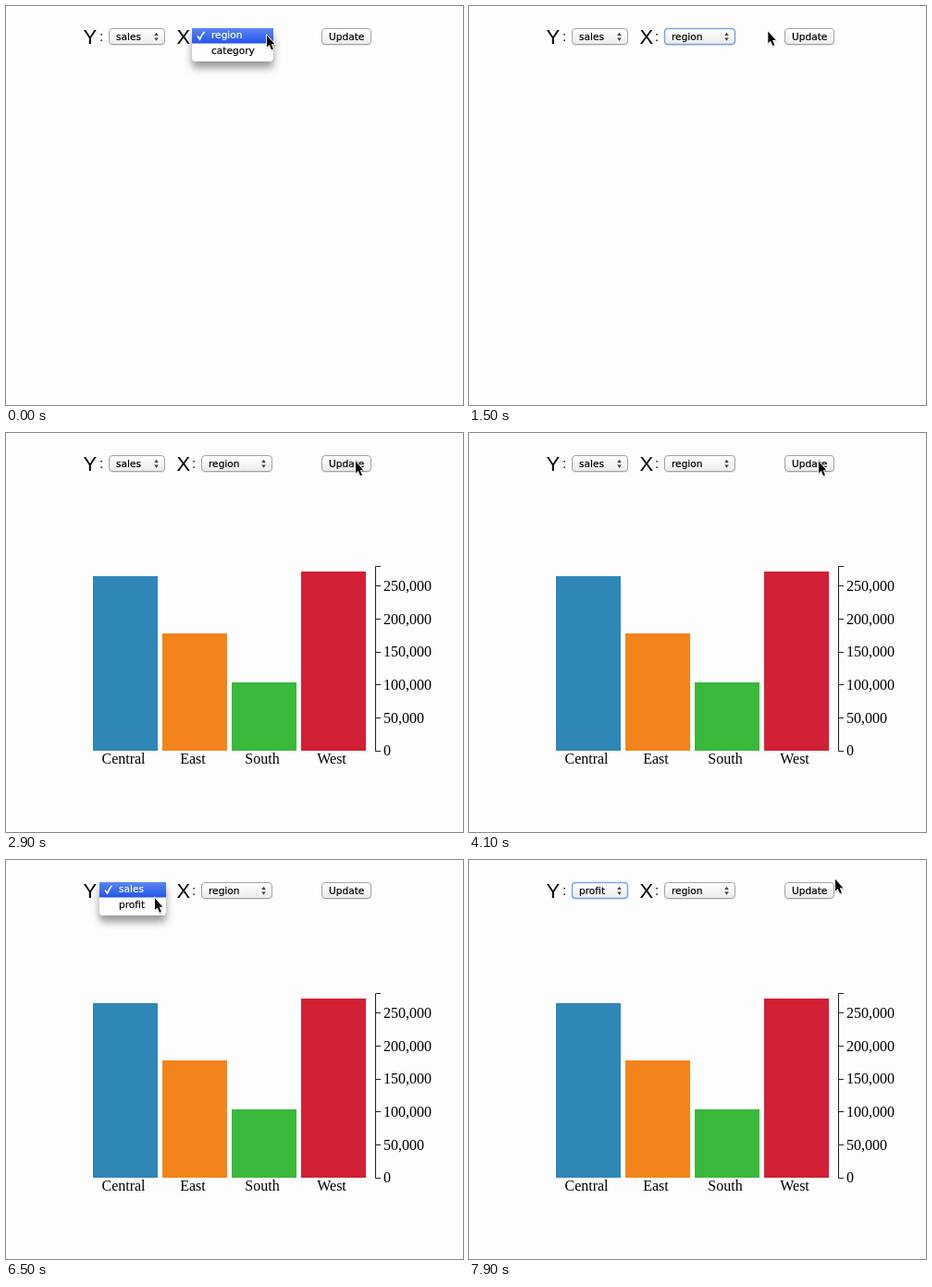
Animation, 494 px wide and 432 px high, one loop 8 s. Source, as an HTML page:

```html
<!DOCTYPE html>
<html lang="en">
<head>
<meta charset="utf-8">
<title>Bar chart form</title>
<style>
  html, body { margin: 0; width: 100%; height: 100%; overflow: hidden; background: #fdfdfd; }
  svg { display: block; }
  .ui { font: 10.6px "DejaVu Sans", sans-serif; }
  .ui text { stroke: currentColor; fill: currentColor; stroke-width: .2; }
  .big { font: 22px "Liberation Sans", sans-serif; }
  .colon { font: 15px "Liberation Sans", sans-serif; }
  #chart { font: 16px "Liberation Serif", serif; }
</style>
</head>
<body>
<svg width="494" height="432" viewBox="0 0 494 432">
  <defs>
    <linearGradient id="grey" x2="0" y2="1">
      <stop stop-color="#fff"/><stop offset=".5" stop-color="#f6f6f6"/><stop offset="1" stop-color="#ebebeb"/>
    </linearGradient>
    <linearGradient id="pressed" x2="0" y2="1">
      <stop stop-color="#a9c8f3"/><stop offset=".5" stop-color="#6a9fe8"/><stop offset="1" stop-color="#9ccaf8"/>
    </linearGradient>
    <linearGradient id="chosen" x2="0" y2="1">
      <stop stop-color="#5c87f4"/><stop offset="1" stop-color="#2453ea"/>
    </linearGradient>
    <filter id="shade" x="-30%" y="-30%" width="160%" height="220%">
      <feDropShadow dx="0" dy="7" stdDeviation="4.5" flood-opacity=".4"/>
    </filter>
    <filter id="soft" x="-50%" y="-50%" width="200%" height="200%">
      <feDropShadow dx="0" dy="1" stdDeviation=".7" flood-opacity=".25"/>
    </filter>
  </defs>
  <text class="big" x="83.6" y="41">Y</text>
  <text class="colon" x="101" y="38">:</text>
  <text class="big" x="184.6" y="41">X</text>
  <text class="colon" x="201" y="38">:</text>
  <g id="form" class="ui"></g>
  <g id="chart"></g>
  <g id="menus" class="ui"></g>
  <path id="cursor" d="M1 .8V13.4L3.7 10.9L6 16.2L7.9 15.4L5.7 10.2H9.3Z" stroke="#fff" stroke-width="1.6" paint-order="stroke" filter="url(#soft)"/>
</svg>
<script>
const $ = id => document.getElementById(id);

function add(parent, tag, attrs, text = '') {
  const el = document.createElementNS('http://www.w3.org/2000/svg', tag);
  for (const key in attrs) el.setAttribute(key, attrs[key]);
  el.textContent = text;
  parent.append(el);
  return el;
}

function control(x, width, label, isSelect) {
  const frame = (y, attrs) => add($('form'), 'rect', { x: x + .5, y, width: width - 1, height: 17, rx: 3.5, fill: 'none', ...attrs });
  frame(25.5, { stroke: '#000', opacity: .1 });
  const box = frame(24.5, { fill: 'url(#grey)', stroke: '#a3a3a3' });
  const ring = frame(24.5, { stroke: '#78a9e2', 'stroke-width': 1.5, visibility: 'hidden' });
  const text = add($('form'), 'text', { x: x + 8, y: 37 }, label);
  if (isSelect) {
    const ax = x + width - 9.5;
    add($('form'), 'path', { d: `M${ax - 2.3} 32l2.3 -3.2l2.3 3.2zM${ax - 2.3} 34.5l2.3 3.2l2.3 -3.2z`, fill: '#444' });
  }
  return { ring, box, text };
}

function menu(x, width, items) {
  const g = add($('menus'), 'g', {});
  add(g, 'path', { d: `M${x} 24h${width}v31q0 5 -5 5h${10 - width}q-5 0 -5 -5z`, fill: '#fff', filter: 'url(#shade)' });
  const bar = add(g, 'rect', { x, y: 24, width, height: 16.5, fill: 'url(#chosen)' });
  const check = add(g, 'path', { d: `M${x + 6} 32.5l2.5 3.5q2 -5 5 -8`, fill: 'none', 'stroke-width': 1.7 });
  const labels = items.map((item, i) => add(g, 'text', { x: x + 21, y: 35.3 + 16.2 * i }, item));
  return (opacity, row) => {
    g.setAttribute('opacity', opacity);
    bar.setAttribute('visibility', row < 0 ? 'hidden' : 'inherit');
    bar.setAttribute('y', 24 + 16 * Math.max(row, 0));
    labels.forEach((el, i) => el.setAttribute('color', i === row ? '#fff' : '#000'));
    check.setAttribute('stroke', row === 0 ? '#fff' : '#000');
  };
}

const ySelect = control(111, 61, 'sales', true);
const xSelect = control(211, 77, 'region', true);
const update = control(341, 54, 'Update');
const yMenu = menu(101, 72, ['sales', 'profit']);
const xMenu = menu(201, 88, ['region', 'category']);

const bars = [['Central', 155, '#2f87b8'], ['East', 217, '#f3841b'], ['South', 270, '#39b83c'], ['West', 150, '#d22035']];
bars.forEach(([name, top, fill], i) => {
  const x = 94 + 75 * i;
  add($('chart'), 'rect', { x, y: top, width: 70, height: 344 - top, fill });
  add($('chart'), 'text', { x: x + 33, y: 358, 'text-anchor': 'middle' }, name);
});
let axis = 'M405 144.5H399.5V344.5H405';
for (let i = 0; i < 6; i++) {
  const y = 344 - 35.65 * i;
  axis += `M399.5 ${Math.floor(y) + .5}h5.5`;
  add($('chart'), 'text', { x: 408, y: y + 5.2 }, (i * 50000).toLocaleString('en-US'));
}
add($('chart'), 'path', { d: axis, fill: 'none', stroke: '#222' });

// pointer moves: start and end time, then start, control and end point of an arc
const moves = [
  [0, 600, [281, 31], [281, 32], [280, 33]],
  [1250, 1800, [280, 33], [329, 21], [378, 31]],
  [1800, 2100, [378, 31], [378, 31], [377, 30]],
  [4700, 5700, [377, 30], [270, 60], [163, 28]],
  [6200, 6700, [163, 28], [160, 38], [159, 47]],
  [7100, 7900, [159, 47], [250, 150], [395, 20]]
];

function pointerAt(t) {
  const [start, end, a, b, c] = moves.findLast(m => m[0] <= t);
  const u = Math.min(1, (t - start) / (end - start));
  const s = u * u * (3 - 2 * u), r = 1 - s;
  return a.map((v, i) => r * r * v + 2 * r * s * b[i] + s * s * c[i]);
}

const show = (el, on) => el.setAttribute('visibility', on ? 'visible' : 'hidden');
const fade = (t, start) => Math.max(0, Math.min(1, 1 - (t - start) / 300));

function draw(now) {
  const t = Math.floor(now % 8000 / 100) * 100;
  const down = t >= 2700 && t < 2900;
  xMenu(fade(t, 800), t === 800 ? -1 : 0);
  yMenu(t < 6200 ? 0 : fade(t, 7000), t < 6600 ? 0 : t === 7000 ? -1 : 1);
  show(xSelect.ring, t >= 900 && t < 2700);
  show(ySelect.ring, t >= 7100);
  ySelect.text.textContent = t < 7100 ? 'sales' : 'profit';
  update.box.setAttribute('fill', down ? 'url(#pressed)' : 'url(#grey)');
  update.box.setAttribute('stroke', down ? '#5b7fb5' : '#a3a3a3');
  show($('chart'), t >= 2900);
  $('cursor').setAttribute('transform', `translate(${pointerAt(t)})`);
  requestAnimationFrame(draw);
}
requestAnimationFrame(draw);
</script>
</body>
</html>
```
